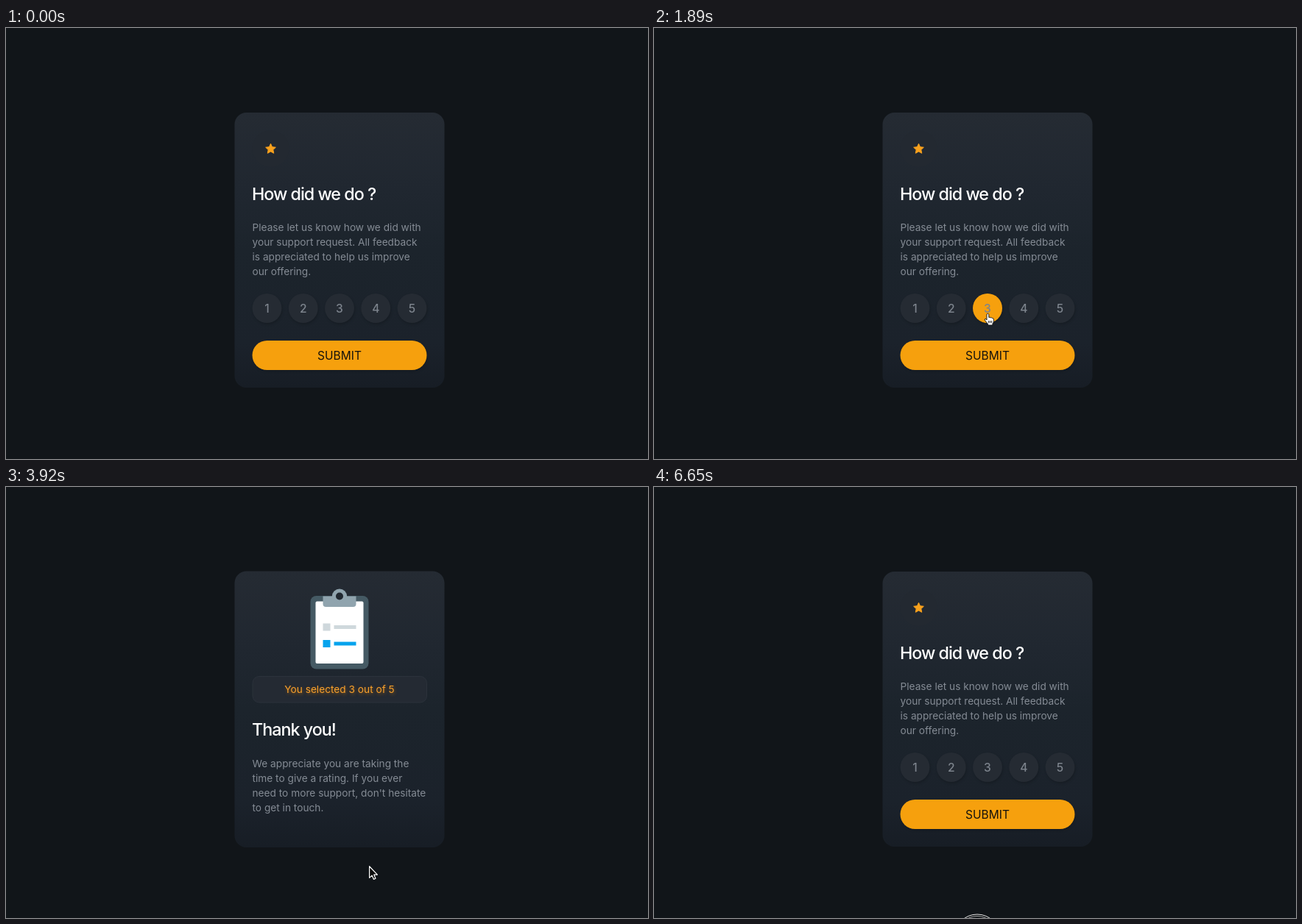
Recreate the animation shown at these times as an HTML page. Size 872 by 586 pixels, loop 6720 ms.

```html
<!DOCTYPE html>
<html lang="en">
<head>
<meta charset="utf-8">
<title>Rating card</title>
<style>
  html, body { margin: 0; height: 100%; overflow: hidden; background: #111519; }
  svg { display: block; font-family: Inter, Roboto, sans-serif; }
  .title { font-size: 23.3px; font-weight: 500; letter-spacing: -1px; fill: #fff; }
  .body { font-size: 13.7px; fill: #848b94; }
  .mid { text-anchor: middle; }
  .num { font-size: 15.6px; font-weight: 500; fill: #7d848d; }
  .send { font-size: 15.5px; fill: #14120d; }
  .note { fill: #f9a02c; text-shadow: 1px 2px 4px #b86a00a0; }
  .raised { filter: drop-shadow(1px 2px 1.5px #0e131966); }
</style>
</head>
<body>
<svg width="872" height="586" viewBox="0 0 872 586">
  <defs>
    <linearGradient id="shade" x1="0" y1="0" x2="0" y2="1">
      <stop offset="0" stop-color="#252b33"/>
      <stop offset=".28" stop-color="#202730"/>
      <stop offset=".5" stop-color="#1c242c"/>
      <stop offset=".84" stop-color="#1b222b"/>
      <stop offset="1" stop-color="#171d25"/>
    </linearGradient>
  </defs>
  <rect id="card" x="310.5" width="285" rx="16" fill="url(#shade)"/>

  <g id="form">
    <circle cx="359.5" cy="164" r="25" fill="#232931"/>
    <path id="star" fill="#f8a11d" stroke="#f8a11d" stroke-linejoin="round"/>
    <text class="title" x="334" y="234">How did we do ?</text>
    <g id="ask" class="body"></g>
    <g id="scores"></g>
    <rect class="raised" x="334.5" y="425" width="237" height="40" rx="20" fill="#f6a00d"/>
    <text class="send mid" x="453" y="451">SUBMIT</text>
  </g>

  <g id="thanks">
    <rect x="413.5" y="148" width="79" height="99.5" rx="8" fill="#455a64"/>
    <rect x="420.5" y="155.5" width="65" height="84.5" rx="2" fill="#fff"/>
    <g fill="#90a4ae">
      <path d="M430.5 148.500h45v10.500a4 4 0 0 1-4 4h-37a4 4 0 0 1-4-4z"/>
      <circle cx="453" cy="148.700" r="10.200"/>
    </g>
    <circle cx="453" cy="148.500" r="5" fill="#202830"/>
    <path d="M430.500 185.500h10v10h-10zM445.500 188h30v5h-30z" fill="#cfd8dc"/>
    <path d="M430.500 208h10v10h-10zM445.500 210.500h30v5h-30z" fill="#06a3ed"/>
    <rect x="335" y="257.500" width="236.500" height="35.500" rx="9" fill="#242a33" stroke="#2b323b"/>
    <text class="body note mid" x="453" y="280.200">You selected 3 out of 5</text>
    <text class="title" x="334" y="338">Thank you!</text>
    <g id="reply" class="body"></g>
  </g>

  <g id="ring" fill="none">
    <circle r="29.800" stroke="#15181b" stroke-width="4"/>
    <circle r="31" stroke="#e4e4e4"/>
    <circle r="28.500" stroke="#c4c4c4" stroke-width=".8"/>
  </g>
  <g id="cursor">
    <path id="arrow" transform="translate(0 -.6)" d="M.5 0V15.600L4 12.400 6.300 17.600 8.900 16.500 6.700 11.400H11.300Z" fill="#0b0b0b" stroke="#fff" stroke-width="1.200" stroke-linejoin="round"/>
    <g id="hand" stroke="#111" stroke-width=".9" stroke-linejoin="round">
      <path fill="#fff" d="M0 10V2.800a1.400 1.400 0 0 1 2.800 0V6.500q1.400-.8 2.500.4 1.400-.6 2.200.6 1.600-.2 1.800 1.500V11.500q0 2-1.400 3.500V17H1.600V15.500Q-.5 13-2.600 10.200q-.8-1.400.6-1.800 1 0 2 1.600z"/>
      <path fill="none" d="M2.600 11v3.200M4.600 11v3.200M6.600 11v3.200"/>
    </g>
  </g>
</svg>
<script>
const $ = id => document.getElementById(id);
const LOOP = 6720, STEP = 70;
const ENTER = 140, SELECT = 1610, SENT = 2660, RESET = 5670;
const PRESSES = [1540, 2520, 6650], PRESS_TIME = 140;

// Pointer glides: start, end, and the point to reach
const glides = [
  [140, 910, 452, 378], [1400, 1540, 452, 387], [2030, 2380, 444, 438.5],
  [3080, 3360, 471, 368], [3430, 3640, 436, 281],
  [4340, 4690, 448.5, 557.5], [5950, 6020, 439, 612]
];

const clamp = v => Math.max(0, Math.min(1, v));
const progress = (t, from, to) => clamp((t - from) / (to - from));
const ease = k => k * k * (3 - 2 * k);
const show = (id, on) => { $(id).style.display = on ? '' : 'none'; };
const move = (id, x, y) => $(id).setAttribute('transform', `translate(${x} ${y})`);
const mix = (a, b, k) => `rgb(${a.map((v, i) => Math.round(v + (b[i] - v) * k))})`;

const lines = (id, y, rows) => {
  $(id).innerHTML = rows.map((row, i) => `<text x="334.5" y="${y + 20 * i}">${row}</text>`).join('');
};
lines('ask', 276, ['Please let us know how we did with', 'your support request. All feedback',
  'is appreciated to help us improve', 'our offering.']);
lines('reply', 380.5, ['We appreciate you are taking the', 'time to give a rating. If you ever',
  "need to more support, don't hesitate", 'to get in touch.']);

$('scores').innerHTML = [1, 2, 3, 4, 5].map(n => {
  const x = 305.25 + 49.25 * n;
  return `<circle id="score${n}" class="raised" cx="${x}" cy="381" r="20" fill="#252b33"/>
    <text class="num mid" x="${x}" y="387">${n}</text>`;
}).join('');

$('star').setAttribute('d', 'M' + Array.from({ length: 10 }, (_, i) => {
  const r = i % 2 ? 3.5 : 7.2, a = i * Math.PI / 5;
  return `${359.5 + r * Math.sin(a)} ${164.5 - r * Math.cos(a)}`;
}).join('L') + 'Z');

function pointerAt(t) {
  let x = 474, y = 490;
  for (const [from, to, toX, toY] of glides) {
    const k = ease(progress(t, from, to));
    x += (toX - x) * k;
    y += (toY - y) * k;
  }
  // One swing down past the stage edge and back
  const swing = Math.sin(Math.PI * progress(t, 3710, 4200) ** 1.5);
  return [x + 74 * swing, y + 305 * swing];
}

function draw(now) {
  const t = Math.floor(now % LOOP / STEP) * STEP;
  const asking = t < SENT || t >= RESET;
  show('form', asking);
  show('thanks', !asking);
  $('card').setAttribute('y', asking ? 115 : 114.5);
  $('card').setAttribute('height', asking ? 374 : 375.5);

  const chosen = t < SENT ? progress(t, SELECT, SELECT + 210) : 0;
  $('score3').setAttribute('fill', mix([37, 43, 51], [246, 160, 13], chosen));

  const [x, y] = pointerAt(t);
  const overButton = asking && [381, 445].some(mid => Math.abs(y - mid) < 20);
  show('cursor', t >= ENTER);
  show('hand', overButton);
  show('arrow', !overButton);
  move('cursor', x, y);

  show('ring', PRESSES.some(p => t >= p && t < p + PRESS_TIME));
  move('ring', x, y);
}

const start = performance.now();
function tick() {
  draw(performance.now() - start);
  requestAnimationFrame(tick);
}
tick();
</script>
</body>
</html>
```
